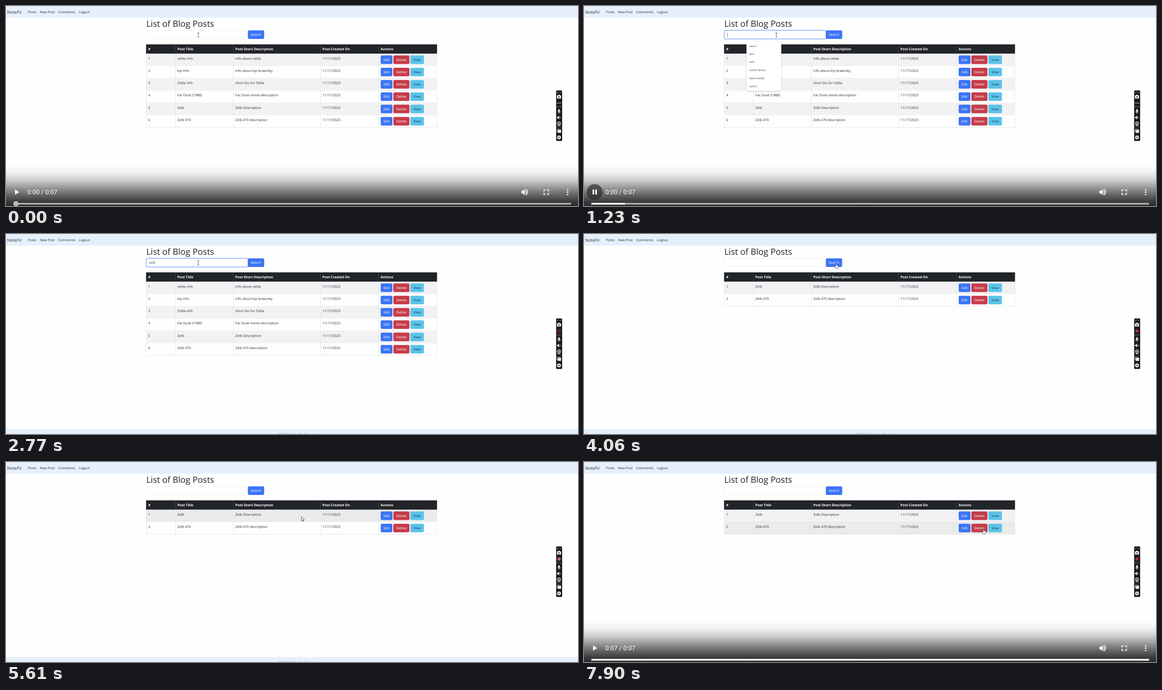
An HTML page with a canvas for the animation above (8460 ms loop, 1264 by 443 pixels).

```html
<!DOCTYPE html>
<html lang="en">
<head>
<meta charset="utf-8">
<title>Blog post search</title>
<style>
html, body { margin: 0; width: 100%; height: 100%; overflow: hidden; background: #fff; }
canvas { display: block; width: 1264px; height: 443px; }
</style>
</head>
<body>
<canvas id="stage" width="1264" height="443"></canvas>
<script>
const ctx = document.getElementById('stage').getContext('2d');
const W = 1264, H = 443, LOOP = 8460;
const SANS = '"Open Sans", "Noto Sans", sans-serif';
const INK = '#2b2f33', BLUE = '#3c74f5', RED = '#c63c49', CYAN = '#5bc3ea';

const PLAY = 800, FOCUS = 920, RESULTS = 3700, END = 7900;
const KEYS = [1600, 1900, 2090, 2280];
const QUERY = 'zelb';
const HISTORY = ['demo', 'java', 'zelb', 'online library', 'data analyst', 'switch'];
const POSTS = [
  ['velda info', 'info about velda'],
  ['kip info', 'info about kip brawnley'],
  ['Odila info', 'short bio for Odila'],
  ['Far Dusk (1988)', 'Far Dusk movie description'],
  ['Zelb', 'Zelb Description'],
  ['Zelb 470', 'Zelb 470 description']
];
const COLUMNS = [310, 374.5, 502.5, 695, 823.5, 952];
const TOP = 105.5, ROW = 27.25;

// Pointer waypoints: time, x, y
const PATH = [
  [2850, 425, 64], [3260, 556, 65], [4600, 556, 65], [5080, 562, 86],
  [5420, 610, 116], [6180, 882, 148]
];

const clamp = v => Math.max(0, Math.min(1, v));
const ramp = (t, a, b) => clamp((t - a) / (b - a));
const smooth = v => v * v * (3 - 2 * v);

function rect(x, y, w, h, fill, r = 0) {
  ctx.fillStyle = fill;
  ctx.beginPath();
  ctx.roundRect(x, y, w, h, r);
  ctx.fill();
}

function box(x, y, w, h, stroke, r = 0, width = 1) {
  ctx.strokeStyle = stroke;
  ctx.lineWidth = width;
  ctx.beginPath();
  ctx.roundRect(x, y, w, h, r);
  ctx.stroke();
}

function dot(x, y, r, fill) {
  ctx.fillStyle = fill;
  ctx.beginPath();
  ctx.arc(x, y, r, 0, 7);
  ctx.fill();
}

function shape(points, fill, stroke) {
  ctx.beginPath();
  points.forEach(([x, y]) => ctx.lineTo(x, y));
  ctx.closePath();
  ctx.fillStyle = fill;
  ctx.fill();
  if (stroke) {
    ctx.strokeStyle = stroke;
    ctx.lineWidth = 0.8;
    ctx.stroke();
  }
}

function line(color, width, ...points) {
  ctx.strokeStyle = color;
  ctx.lineWidth = width;
  ctx.beginPath();
  points.forEach(([x, y], i) => i ? ctx.lineTo(x, y) : ctx.moveTo(x, y));
  ctx.stroke();
}

function arc(x, y, r, from, to, color, width) {
  ctx.strokeStyle = color;
  ctx.lineWidth = width;
  ctx.beginPath();
  ctx.arc(x, y, r, from, to);
  ctx.stroke();
}

function text(str, x, y, { size = 7.5, weight = 400, color = INK, align = 'left', family = SANS } = {}) {
  ctx.font = `${weight} ${size}px ${family}`;
  ctx.fillStyle = color;
  ctx.textAlign = align;
  ctx.fillText(str, x, y);
}

function button(label, x, y, w, fill, color = '#fff') {
  rect(x, y, w, 19, fill, 3);
  text(label, x + w / 2, y + 12.2, { color, align: 'center' });
}

function drawPage() {
  rect(0, 0, W, H, '#fefefe');
  rect(0, 0, W, 26, '#e6f0fb');
  rect(0, 432, W, 11, '#e6f0fb');
  text('NoteFir', 2.5, 16.5, { size: 9.5 });
  [['Posts', 48.5], ['New Post', 75], ['Comments', 115], ['Logout', 161]]
    .forEach(([label, x]) => text(label, x, 15.5));
  text('List of Blog Posts', 310, 46, { size: 19, weight: 500, color: '#212529' });
  text('© 2023 NoteFir. All rights', 645, 447.3, { color: '#777', align: 'center' });
}

function drawSearch(t) {
  const focused = t >= FOCUS && t < RESULTS;
  const typed = QUERY.slice(0, KEYS.filter(k => t >= k).length);
  rect(310, 54, 225, 19, '#fff', 3);
  if (focused) {
    box(309.5, 53.5, 226, 20, 'rgba(60,110,245,.25)', 4, 2.5);
    box(310.5, 54.5, 224, 18, '#8fb2f7', 3);
    text(typed, 316, 66.3, { color: '#444' });
    ctx.font = `7.5px ${SANS}`;
    const caret = 316.7 + ctx.measureText(typed).width;
    if (t < 2500) line('#555', 0.8, [caret, 59], [caret, 69]);
  } else {
    box(310.5, 54.5, 224, 18, '#ebebee', 3);
  }
  button('Search', 534.5, 54, 36, BLUE);
}

function drawTable(t) {
  const rows = t < RESULTS ? POSTS : POSTS.slice(-2);
  const hovered = t < 5050 ? -1 : t < 5900 ? 0 : 1;
  const bottom = TOP + rows.length * ROW;

  rows.forEach((row, i) => {
    const y = TOP + i * ROW;
    rect(310, y, 642, ROW, i === hovered ? '#ebebeb' : i % 2 ? '#fefefe' : '#f2f1f3');
    [String(i + 1), ...row, '11/17/2023'].forEach((cell, c) => text(cell, COLUMNS[c] + 4.3, y + 13));
    button('Edit', 828, y + 4, 26, BLUE);
    button('Delete', 856, y + 4, 35.5, RED);
    button('View', 893.5, y + 4, 30, CYAN, '#1d3a4a');
    line('#e6e6e9', 1, [310, y + ROW], [952, y + ROW]);
  });
  COLUMNS.forEach(x => line('#e6e6e9', 1, [x, TOP], [x, bottom]));

  rect(309.5, 85, 643, 20.5, '#212529');
  COLUMNS.slice(1, 5).forEach(x => line('#3b4045', 1, [x, 85], [x, 105]));
  ['#', 'Post Title', 'Post Short Description', 'Post Created On', 'Actions']
    .forEach((head, c) => text(head, COLUMNS[c] + 4.3, 98, { weight: 700, color: '#fff' }));
}

function drawSuggestions(t) {
  if (t < FOCUS || t >= 2400) return;
  const items = t < KEYS[0] ? HISTORY : [QUERY];
  const h = 20 + (items.length - 1) * 17.8;
  ctx.save();
  ctx.shadowColor = 'rgba(0,0,0,.28)';
  ctx.shadowBlur = 3;
  ctx.shadowOffsetY = 1;
  rect(359, 79, 77, h, '#fff', 2);
  ctx.restore();
  shape([[364, 79.5], [369, 75], [374, 79.5]], '#fff');
  items.forEach((item, i) => text(item, 365, 90.5 + i * 17.8, { size: 6, color: '#444' }));
}

function drawRecorder(t) {
  const x = 1222, white = '#f4f4f4', dark = '#1c1a1c';
  rect(1215.7, 187, 13.3, 112, dark, 2);
  line('#ccc', 1, [1218, 193], [1221, 189.5]);
  line('#999', 1, [1223.5, 191.5], [1227.5, 191.5]);

  rect(x - 4.5, 198, 9, 7, white, 1);
  rect(x - 2, 196.7, 4, 2, white);
  dot(x, 201.5, 2, dark);
  dot(x, 201.5, 1, white);

  drawRecordLight(t, x, 215);
  text('00:0' + Math.floor(Math.min(t, 6000) / 2000), x, 225, { size: 4, color: '#aaa', align: 'center' });

  rect(x - 1.7, 228.5, 3.4, 6.5, white, 1.7);
  arc(x, 233, 3.2, 0, Math.PI, white, 1);
  line(white, 1, [x, 236], [x, 238.5]);

  shape([[1217.5, 245.5], [1219.5, 245.5], [1222.5, 243], [1222.5, 251], [1219.5, 248.5], [1217.5, 248.5]], white);
  line(white, 1, [1224, 247], [1227, 247]);

  arc(x, 260, 3.6, 0, 7, white, 1.3);
  dot(x, 260, 1.6, white);
  line(white, 1.2, [x - 3, 265], [x + 3, 265]);
  line('#8d3a36', 0.8, [1217, 268.5], [1228, 268.5]);

  box(x - 4, 273, 7, 6, white, 0, 1);
  rect(x - 2.5, 274.5, 7, 6.5, white);

  dot(x, 291, 3.6, white);
  for (let i = 0; i < 8; i++) {
    const a = i * Math.PI / 4, c = Math.cos(a), s = Math.sin(a);
    line(white, 1.6, [x + 3 * c, 291 + 3 * s], [x + 4.7 * c, 291 + 4.7 * s]);
  }
  dot(x, 291, 1.5, dark);
}

function drawRecordLight(t, x, y) {
  if (t < 2440) {
    [-3.3, 0, 3.3].forEach(d => dot(x + d, y, 1.1, '#f4f4f4'));
    return;
  }
  const pale = t < 4800 ? ramp(t, 4160, 4310) : 1 - ramp(t, 5460, 5700);
  const glow = 0.45 + 0.55 * ramp(t, 2700, 3250);
  arc(x, y, 4.2, 0, 7, `rgba(230,225,225,${0.2 + 0.6 * pale})`, 0.9);
  dot(x, y, 2.8, `rgba(220,45,50,${glow})`);
  dot(x, y, 2.8, `rgba(245,245,245,${pale})`);
}

function pointerAt(t) {
  if (t <= PATH[0][0]) return PATH[0].slice(1);
  for (let i = 1; i < PATH.length; i++) {
    const [t0, x0, y0] = PATH[i - 1], [t1, x1, y1] = PATH[i];
    if (t < t1) {
      const k = smooth(ramp(t, t0, t1));
      return [x0 + (x1 - x0) * k, y0 + (y1 - y0) * k];
    }
  }
  return PATH[PATH.length - 1].slice(1);
}

function drawPointer(t) {
  const [x, y] = pointerAt(t);
  const onButton = (y > 54 && y < 73 && x > 535 && x < 571) || (x > 828 && y > 109);
  ctx.save();
  ctx.translate(x, y);
  if (onButton) {
    shape([[0, 0], [1.5, 0], [2, 4], [6, 5.2], [6, 8.5], [4.8, 11], [0.5, 11], [-2.5, 6.8], [-1.5, 6], [0, 7]], '#fff', '#222');
  } else if (x < 535 && y < 73) {
    line('#444', 0.9, [0, -4], [0, 4]);
    line('#444', 0.9, [-2, -4.5], [2, -4.5]);
    line('#444', 0.9, [-2, 4.5], [2, 4.5]);
  } else {
    shape([[0, 0], [0, 9.5], [2.2, 7.5], [3.8, 10.5], [5, 10], [3.6, 7], [6.5, 6.8]], '#fff', '#222');
  }
  ctx.restore();
}

function drawShade(alpha) {
  const shade = ctx.createLinearGradient(0, 350, 0, H);
  [[0, 0], [0.2, 0.05], [0.38, 0.19], [0.55, 0.39], [0.72, 0.59], [0.87, 0.74], [1, 0.82]]
    .forEach(([at, a]) => shade.addColorStop(at, `rgba(0,0,0,${a})`));
  ctx.globalAlpha = alpha;
  rect(0, 350, W, 93, shade);
  ctx.globalAlpha = 1;
}

function drawControls(t) {
  const ended = t >= END;
  const alpha = ended ? 1 : 1 - ramp(t, 1230, 1530);
  drawShade(Math.max(alpha, t < 2400 ? 0.025 : 0));
  if (!alpha) return;

  const playing = t >= 700 && !ended;
  const hover = ended ? 0 : ramp(t, 30, 240);
  const progress = ended ? 1 : clamp((t - PLAY) / 7100);
  ctx.globalAlpha = alpha;

  dot(23.5, 412, 17.5, `rgba(40,40,40,${0.65 * hover})`);
  if (playing) {
    rect(19, 406.5, 3.5, 11, '#fff');
    rect(25, 406.5, 3.5, 11, '#fff');
  } else {
    shape([[20, 406.3], [20, 418], [29, 412.2]], '#fff');
  }
  text(`0:0${ended ? 7 : 0} / 0:07`, 47, 417, { size: 14, color: '#fff', family: 'Roboto, sans-serif' });

  shape([[1139, 409.5], [1142, 409.5], [1146, 405.5], [1146, 419], [1142, 415], [1139, 415]], '#fff');
  arc(1146.5, 412.2, 3.2, -1.3, 1.3, '#fff', 2);
  arc(1146, 412.2, 6.8, -1.25, 1.25, '#fff', 1.6);

  [-1, 1].forEach(sx => [-1, 1].forEach(sy => {
    const x = 1193.7 + sx * 5, y = 412.3 + sy * 5;
    line('#fff', 1.8, [x - sx * 3.5, y], [x, y], [x, y - sy * 3.5]);
  }));
  [407, 412.2, 417.4].forEach(y => dot(1241, y, 1.6, '#fff'));

  rect(16, 436, 1233, 4, '#a8a8a8', 2);
  if (progress) rect(16, 436, 1233 * progress, 4, '#fff', 2);
  if (!ended) dot(22, 438, 6, `rgba(185,185,185,${1 - hover})`);
  ctx.globalAlpha = 1;
}

function draw(t) {
  drawPage();
  drawSearch(t);
  drawTable(t);
  drawSuggestions(t);
  drawRecorder(t);
  drawPointer(t);
  drawControls(t);
}

ctx.textRendering = 'geometricPrecision';
const start = performance.now();
function tick() {
  draw((performance.now() - start) % LOOP);
  requestAnimationFrame(tick);
}
tick();
</script>
</body>
</html>
```
